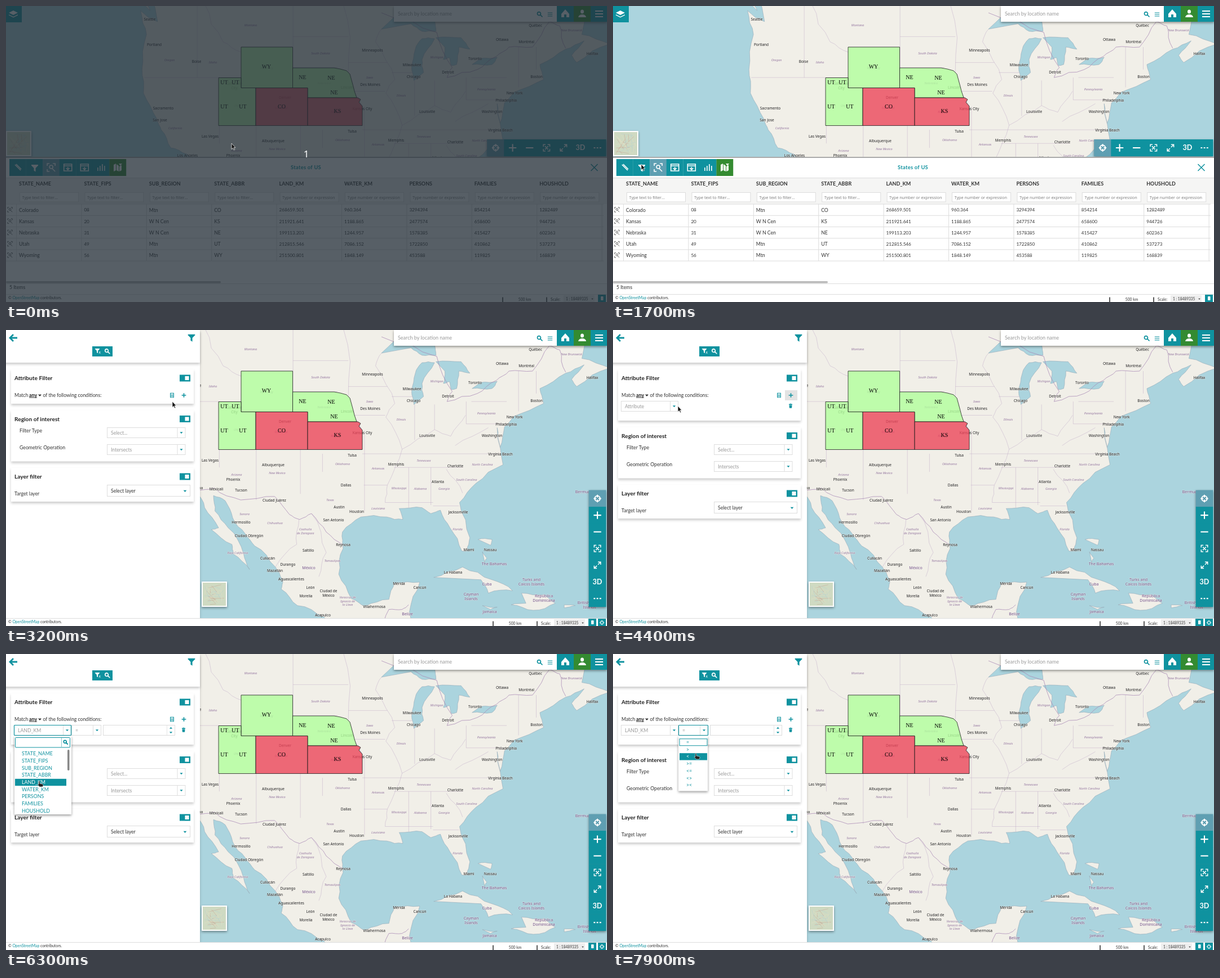
An HTML page that plays this animation: 1066 px wide and 526 px high, repeating every 8000 ms.

```html
<!DOCTYPE html>
<html lang="en">
<head>
<meta charset="utf-8">
<title>Filtering a map layer</title>
<style>
html, body { margin: 0; height: 100%; overflow: hidden; background: #fff; }
svg { display: block; width: 100vw; height: 100vh; font-family: Lato, sans-serif; }
text { white-space: pre; }
.map { font-family: "Noto Sans", sans-serif; text-anchor: middle; paint-order: stroke; stroke: #f2efe9; stroke-width: 1px; stroke-opacity: .6; }
.tag { font-family: "Liberation Serif", serif; text-anchor: middle; }
.shade { filter: drop-shadow(0 2px 2px #0006); }
.card { filter: drop-shadow(0 3px 2px #0003); }
</style>
</head>
<body>
<svg id="stage" viewBox="0 0 1066 526" preserveAspectRatio="none"></svg>
<script>
const TEAL = '#0f929f', GREEN = '#348b31', PALE = '#5f9fb2', INK = '#333', SEA = '#abd4de', LAND = '#f1efe8';
const MID = 'text-anchor="middle"', BOLD = 'font-weight="700"';

// Drawing helpers: each returns SVG markup
const rect = (x, y, w, h, fill, more = '') => `<rect x="${x}" y="${y}" width="${w}" height="${h}" fill="${fill}" ${more}/>`;
const text = (x, y, s, size = 8.7, fill = INK, more = '') =>
  `<text x="${x}" y="${y + size * .35}" font-size="${size}" fill="${fill}" ${more}>${s}</text>`;
const path = (d, stroke, width = 1, fill = 'none', more = '') =>
  `<path d="${d}" stroke="${stroke}" stroke-width="${width}" fill="${fill}" ${more}/>`;
const group = (id, body, more = '') => `<g id="${id}" ${more}>${body}</g>`;
const shaded = (body, kind = 'shade') => `<g class="${kind}">${body}</g>`;
const repeat = (n, f) => Array.from({ length: n }, (_, i) => f(i)).join('');
let seed = 7;
const random = () => (seed = seed * 16807 % 2147483647) / 2147483647;

const ICONS = {
  plus: 'M-7 0H7M0-7V7', minus: 'M-7 0H7', menu: 'M-7-5H7M-7 0H7M-7 5H7',
  locate: 'M-5 0a5 5 0 1 0 10 0a5 5 0 1 0-10 0M0-7V-2M0 7V2M-7 0H-2M7 0H2',
  extent: 'M-6-2V-6H-2M2-6H6V-2M6 2V6H2M-2 6H-6V2M-3-3L3 3M3-3L-3 3',
  full: 'M-6 6L-1 1M1-1L6-6M1-6H6V-1M-1 6H-6V1',
  dots: 'M-7 0h3M-1.5 0h3M4 0h3', cross: 'M-6-6L6 6M6-6L-6 6',
  back: 'M7 0H-5M0-6L-6 0L0 6', search: 'M-5-1.5a3.3 3.3 0 1 0 6.6 0a3.3 3.3 0 1 0-6.6 0M1 1L5 5',
  pencil: 'M-5-5L5 5M-3-6L6 3', bars: 'M-6 6V0M-2 6V-3M2 6V-6M6 6V-3',
  table: 'M-7-6H7V6H-7ZM-7-3H7M0-1V4M-3 1L0 4L3 1',
  zoom: 'M-7-3V-7H-3M3-7H7V-3M-7 3V7H-3M7 7L2 2M-3-1a3 3 0 1 0 6 0a3 3 0 1 0-6 0',
  sheet: 'M-3-4H3V4H-3ZM-2-1H2M-2 1.5H2'
};
const icon = (name, x, y, color = '#fff', k = 1, w = 1.9) =>
  path(ICONS[name], color, w, 'none', `transform="translate(${x} ${y}) scale(${k})"`);
const solid = (d, x, y, fill = '#fff', k = 1) => `<path d="${d}" fill="${fill}" transform="translate(${x} ${y}) scale(${k})"/>`;
const FUNNEL = 'M-6-6H6V-4.5L1.5 0V6.5L-1.5 4.5V0L-6-4.5Z', CARET = 'M-2.6-1.2H2.6L0 1.8Z', UP = 'M-2.6 1.2H2.6L0-1.8Z';
const HOME = 'M-7 0L0-8L7 0V6H2V1H-2V6H-7Z', USER = 'M-3-4a3 3.5 0 1 0 6 0a3 3.5 0 1 0-6 0M-7 6Q-6 1 0 1Q6 1 7 6Z';
const BIN = 'M-3.5-4H-1V-5H1V-4H3.5V-2.5H-3.5ZM-3-1.8H3L2.5 4.5H-2.5Z';

// Web Mercator; points are "degrees west,degrees north"
const project = s => {
  const [west, north] = s.split(',').map(Number);
  const m = Math.log(Math.tan(Math.PI / 4 + north * Math.PI / 360));
  return [417 + (111.05 - west) * 13.07, 73 + (.8814 - m) * 748.9];
};
// Midpoint displacement turns a few key points into a natural shoreline
const roughen = (pts, depth) => depth ? roughen(pts.flatMap((p, i) => {
  const q = pts[i + 1];
  if (!q) return [p];
  const k = (random() - .5) * .16;
  return [p, [(p[0] + q[0]) / 2 + (q[1] - p[1]) * k, (p[1] + q[1]) / 2 - (q[0] - p[0]) * k]];
}), depth - 1) : pts;
const trace = (s, depth = 0) => 'M' + roughen(s.split(' ').map(project), depth).map(p => p.map(v => v.toFixed(1))).join('L');
const shore = (s, fill) => path(trace(s, 2) + 'Z', '#93a8b8', .6, fill);
const border = (s, depth, color = '#bda5c4', width = .6) => path(trace(s, depth), color, width, 'none', 'opacity=".75"');

const west = '122.8,52 122.4,47.4 124.7,48.4 123.9,46.2 124.5,42.8 124.3,40.4 122.5,37.7 121.9,36.5 120.6,34.5 118.4,33.8 117.1,32.5 116,30.4 114.1,28 115.1,27.8 112.3,26 112.1,24.8 109.9,22.9 110.7,24.8 112.8,28 114.6,30 114.8,31.8 113.2,31.2 112.2,29.2 110.5,27.3 109.2,25.8 106.4,23.2 105.4,21.6 105.6,20.4 103.4,18.3 99.8,16.8';
const gulf = '98,14 88,14 88.2,17.5 86.8,21.3 90.2,21.2 91,19.1 94.2,18.2 96.1,19.2 97.8,22.3 97.2,25.5 97.3,27.5 94.8,29.3 91.3,29.3 89.1,29 89.6,30.3 86.5,30.4 85.3,29.7 84,30.1 82.7,28 81.1,25.2 80.4,25.2';
const east = '80,26.8 81.4,31 79.2,33.2 75.5,35.3 76.3,39.3 75.9,37.2 75.3,39.4 74,40.5 70,41.8 70.5,43.3 67,44.8 64.5,45.6 66.2,44.2 65.5,43.5 61,45.3 64.8,46.2 61,52';
const islands = ['126,49.4 123.4,48.4 124,49.4', '84.9,21.9 81,23.2 77,21.6 74.2,20.2 77.5,19.9 78.5,21.6',
  '73,19.9 69.9,19.7 68.4,18.6 71.4,17.7 74.4,18.4 72.4,18.6', '78.3,18.3 76.3,18.1 77.2,17.8', '67.2,18.4 65.7,18.3 67.2,18',
  '78.3,25.1 77.7,24.3 78,23.8', '78.9,26.6 77,26.6 77.2,25.9'];
const lakes = ['92,46.7 88,48.8 84.8,47.5 84.6,46.5 86.5,46.5 88,47.2', '87.6,41.7 87.9,43 87.4,44.8 86.5,45.8 84.8,45.8 86.5,43.8 86.3,42.5',
  '84.6,45.9 81.2,45.9 80,44.8 81.5,45 81.8,43.3 82.5,43.2 82.8,44 83.6,43.8 83.4,45', '79.7,43.3 77,43.3 76.3,44 78.5,43.9'];
const nations = ['117.1,32.5 114.7,32.7 111.1,31.3 106.5,31.7 104.5,29.6 103.1,29 101.5,29.7 99.5,27.5 97.2,25.9',
  '92,48.2 84.5,46.4 82.4,43 83.1,42 79,42.8 76.4,44.1 74.7,45 71.5,45 69.2,47.4 67.8,47 67,44.9', '92.2,14.5 91,17.8 89.2,17.8 88.3,18.4'];
const rivers = ['92,46.7 92.8,45.5 90.2,41.8 91.4,40.4 89.2,37 91.2,33 91.5,31', '89.2,37 84.8,39.1 82.6,38.4 80.6,40.6', '97.2,49 96.5,42.5 94.6,39',
  '83.2,34.8 81,32.1', '82,37.4 77.5,39.3', '106.4,23.2 103.5,26 103.2,29', '100.5,22 99.5,25 101.5,29.7', '116,49 113.5,45.5 111,44.5'];
// Straight state lines: [latitude, west end, east end] and [longitude, north end, south end]
const parallels = [[42, 124.2, 111], [37, 114, 94.6], [45, 111, 104], [46, 104, 96.5], [43, 104, 98], [43.5, 96.5, 91.2], [40.6, 95.8, 91.5],
  [36.5, 94.6, 76], [35, 90.3, 81], [33, 94.4, 91.2], [31, 91.5, 85], [30.6, 85, 81.5], [42.5, 90.6, 87.8], [39.7, 80.5, 75.6], [42, 79.8, 75]];
const meridians = [[117, 49, 42], [114, 42, 35], [109, 37, 31.3], [103, 37, 32], [100, 36.5, 34.5], [104, 49, 41],
  [94.3, 39, 30], [88.3, 35, 30.4], [85.3, 35, 30.7], [87.5, 41.7, 38], [84.8, 41.7, 39.1], [80.5, 42, 39.7], [73.4, 45, 41], [71, 45, 42.8]];
const grid = parallels.map(([n, a, b]) => `${a},${n} ${b},${n}`).concat(meridians.map(([w, a, b]) => `${w},${a} ${w},${b}`));

// "Name/second line x y|..."
const labels = (list, size, fill, kind = 'map', more = '') => list.split('|').map(s => {
  const [, name, x, y] = s.match(/(.*) (\d+) (\d+)$/);
  return name.split('/').map((part, i) => text(+x, +y + i * (size + 1), part, size, fill, `class="${kind}" ${more}`)).join('');
}).join('');
const cities = 'Seattle 255 24|Portland 263 69|Boise 338 99|Sacramento 279 182|San Jose 273 203|Las Vegas 362 232|Los Angeles 322 266|Phoenix 403 266|Albuquerque 474 240|Tijuana 338 281|Mexicali 373 283|Tucson 417 285|Ciudad Juárez 476 303|Salt Lake/City 405 138|Denver 495 163|Lincoln 605 145|Des Moines 646 140|Kansas City 632 183|Minneapolis 650 79|Tulsa 614 223|Memphis 692 239|Dallas 603 276|Austin 591 315|Houston 622 323|San Antonio 581 338|Hermosillo 417 342|Ciudad Obregón 431 366|Culiacán 464 406|Mazatlán 477 428|Saltillo 536 392|Reynosa 598 382|Durango 500 417';
const cities2 = 'Aguascalientes 506 443|León 540 458|Morelia 532 473|Ciudad de/México 572 464|Acapulco 562 507|Mérida 697 451|Cancún 734 458|Villahermosa 653 492|Milwaukee 720 105|Chicago 723 126|Detroit 784 118|Toronto 832 94|Ottawa 880 60|Montréal 923 64|Québec 939 35|Boston 941 126|New York 902 155|Philadelphia 887 168|Washington 862 188|Louisville 747 188|Virginia Beach 877 221|Charlotte 797 242|Atlanta 766 270|Jacksonville 802 324|Miami 821 391|Nassau 859 391|La Habana 793 431|Halifax 1040 85';
const regions = 'Montana 434 34|Oregon 290 96|Idaho 367 100|South Dakota 558 84|Wyoming 462 110|Nebraska 564 137|Utah 410 177|California 300 217|Arizona 409 257|New Mexico 481 254|Colorado 488 181|Kansas 585 188|Oklahoma 597 238|Texas 575 302|Iowa 645 127|Illinois 701 159|Michigan 764 91|Arkansas 660 246|Tennessee 741 232|Mississippi 697 281|Alabama 735 282|Georgia 777 282|Louisiana 660 317|Florida 801 354|South Carolina 817 266|North Carolina 845 239|Pennsylvania 852 148|New Brunswick 1003 43|Baja California 411 396|Sonora 423 327|Chihuahua 477 343|Coahuila/de Zaragoza 531 354|Tamaulipas 579 410|Veracruz de/Ignacio de/la Llave 606 475';
const countries = 'México 537 423|The Bahamas 866 416|Cuba 853 452|Belize 712 505|Jamaica 858 501|Cayman/Islands 825 470|Turks and/Caicos Islands 932 444|República/Dominicana 954 473|British Virgin/Islands 1035 485|Bermuda 1025 288';
const tags = 'WY 462 107|CO 489 178|KS 588 186|NE 526 126|NE 577 127|NE 582 153|UT 387 135|UT 407 135|UT 387 178|UT 420 178';

const feature = (d, fill) => path(d, '#222', .8, fill, 'fill-opacity=".8"');
const lime = '#b2ff9d', rose = '#ed465a';
const map = rect(0, 0, 1066, 526, SEA) + shore([west, gulf, east].join(' '), LAND) +
  islands.map(s => shore(s, LAND)).join('') + lakes.map(s => shore(s, SEA)).join('') +
  grid.map(s => border(s, 0)).join('') + rivers.map(s => border(s, 2)).join('') + nations.map(s => border(s, 2, '#a988b4', 1)).join('') +
  labels(regions, 5.6, '#95789f', 'map', 'font-style="italic"') + labels(cities, 6.5, '#222') + labels(cities2, 6.5, '#222') + labels(countries, 7, '#76558c') +
  feature('M417 73H508.5V145.5H417Z', lime) + feature('M377 127.5H417V145.5H443V212.5H377Z', lime) +
  feature('M508.5 110H582l11 2 11 3 6 6 6 22 2 8 4 12H535V145.5H508.5Z', lime) +
  feature('M443 145.5H535V212.5H443Z', rose) + feature('M535 163H624l5 3-3 5 6 7V212.5H535Z', rose) + labels(tags, 10, '#000', 'tag');

const header = shaded(rect(688, 0, 289, 28, '#fff') + rect(977, 0, 30, 28, TEAL) + rect(1007, 0, 30, 28, GREEN) + rect(1037, 0, 29, 28, TEAL)) +
  solid(HOME, 992, 14) + solid(USER, 1022, 14) + icon('menu', 1052, 14) +
  text(695, 14, 'Search by location name', 9, '#999') + icon('search', 947, 15, TEAL, .9) + icon('menu', 965, 15, TEAL, .6, 2);
const layersButton = rect(0, 0, 28, 29, TEAL) + solid('M0-6L8-2L0 2L-8-2ZM-8 1L0 5L8 1V2.5L0 6.5L-8 2.5Z', 13, 14);

// Map controls in a row or a column
const controls = (x, y, dx, dy) => shaded(['locate', 'plus', 'minus', 'extent', 'full', '3D', 'dots'].map((n, i) => {
  const cx = x + i * dx, cy = y + i * dy;
  return rect(cx - 15.3, cy - 15, 30.6, 30, i ? TEAL : PALE) +
    (n == '3D' ? text(cx, cy, n, 12.5, '#fff', `${MID} ${BOLD}`) : icon(n, cx, cy, '#fff', .95, i == 3 || i == 4 ? 1.6 : 2.2));
}).join(''));
const spot = () => 4 + random() * 37;
const thumb = (x, y) => shaded(rect(x, y, 45, 45, '#fff') + rect(x + 2, y + 2, 41, 41, '#cfdac2')) +
  repeat(30, i => path(`M${x + spot()} ${y + spot()}L${x + spot()} ${y + spot()}`, ['#c9a18f', '#b4d0d2', '#e6dfc4'][i % 3], .8, 'none', 'opacity=".6"'));
const corner = (x, globe) => rect(x, 513, 14, 13, TEAL) +
  (globe ? icon('locate', x + 7, 520, '#fff', .6, 1.5) : rect(x + 5, 516, 4.5, 7, '#fff', 'rx="1"'));
const footer = dx => rect(0, 512, 1066, 14, '#fff') + rect(0, 512, 1066, 1, '#ddd') +
  text(4, 518.5, `© <tspan fill="${TEAL}">OpenStreetMap</tspan> contributors.`, 6.8) +
  path(`M${881 + dx} 517.5V526M${959 + dx} 517.5V526`, '#333', 1.6) + text(920 + dx, 521.5, '500 km', 6.8, INK, MID) +
  text(966 + dx, 521.5, 'Scale:', 6.8) + rect(989 + dx, 514, 55, 12, '#eee') + text(993 + dx, 520.5, '1 : 18489335', 6.6) +
  solid(CARET, 1040 + dx, 520.5, INK, .7);

// Attribute table
const fields = ['STATE_NAME', 'STATE_FIPS', 'SUB_REGION', 'STATE_ABBR', 'LAND_KM', 'WATER_KM', 'PERSONS', 'FAMILIES', 'HOUSHOLD'];
const rows = ['Colorado|08|Mtn|CO|268659.501|960.364|3294394|854214|1282489', 'Kansas|20|W N Cen|KS|211921.641|1188.865|2477574|658600|944726',
  'Nebraska|31|W N Cen|NE|199113.203|1244.957|1578385|415427|602363', 'Utah|49|Mtn|UT|212815.546|7086.152|1722850|410862|537273',
  'Wyoming|56|Mtn|WY|251500.801|1848.149|453588|119825|168839'];
const colX = i => 18.5 + i * 115.4, lineY = i => 352 + i * 20.2;
const tools = ['pencil', '', 'zoom', 'table', 'table', 'bars', ''];
const table = rect(0, 269, 1066, 257, '#fff') + rect(0, 268, 1066, 2, '#aaa') +
  tools.map((t, i) => rect(6 + i * 29.57, 272, 29.8, 30, i == 2 ? PALE : i == 6 ? GREEN : TEAL) + (t && icon(t, 21 + i * 29.57, 287, '#fff', 1, 1.6))).join('') +
  solid(FUNNEL, 51, 288) + solid('M-7-5L-3-7V5L-7 7ZM-2-6L2-3V7L-2 5ZM3-2L7-4V5L3 7ZM2-7H8L5-3Z', 198, 287) +
  text(532, 287, 'States of US', 9.3, TEAL, `${MID} letter-spacing=".3" ${BOLD}`) + icon('cross', 1043.5, 287, TEAL, 1, 1.5) +
  rect(0, 305.5, 1066, 46.5, '#f5f5f4') + rect(0, 305, 1066, 1, '#ddd') +
  fields.map((f, i) => text(colX(i) + 4.5, 316, f, 9, INK, BOLD) + rect(colX(i) + 6, 331.5, 104, 16.5, '#fff', 'stroke="#ddd"') +
    `<svg x="${colX(i) + 10}" y="331" width="96" height="17">` +
    text(0, 9, i < 4 ? 'Type text to filter...' : 'Type number or expression', 7.3, '#777', 'font-family="Open Sans, sans-serif"') + '</svg>').join('') +
  rows.map((r, j) => icon('zoom', 7, lineY(j) + 10, '#444', .6, 1.4) +
    r.split('|').map((s, i) => text(colX(i) + 4.5, lineY(j) + 10.5, s, /\d/.test(s) ? 8.1 : 8.7)).join('')).join('') +
  repeat(6, j => rect(0, lineY(j) - .4, 1060, 1, '#ddd')) + repeat(10, i => rect(colX(i) - .5, 352, 1, 101, '#ddd')) +
  rect(0, 489, 381, 3.5, '#b9b9b9', 'rx="1.7"') + rect(0, 493, 1066, 1, '#ddd') + text(6, 499.5, '5 Items') + footer(0) + corner(1050, false);

// Filter panel
const box = (x, y, w, h = 18) => rect(x + .5, y + .5, w, h, '#fff', 'stroke="#ddd"');
const combo = (x, y, w, s, split = 14) => box(x, y, w) + text(x + 7, y + 9.5, s, 8.7, '#999') +
  rect(x + w - split, y + 1, 1, 17, '#ddd') + solid(CARET, x + w - split / 2 + .5, y + 9.5, TEAL);
const card = (y, h, title, body, more = '') => shaded(rect(9, y, 324, h, '#fff', more), 'card') +
  text(15, y + 15.5, title, 10.2, '#222', BOLD) + rect(308, y + 9.5, 19, 12, TEAL) + rect(317.5, y + 12, 7, 7, '#fff') + body;
const panel = rect(-60, 0, 404, 512, '#fff') + shaded(rect(-60, 0, 404, 58, '#fff'), 'card') +
  icon('back', 13, 14, TEAL, 1, 2.8) + solid(FUNNEL, 329, 14, TEAL, 1.05) +
  rect(153, 29, 36, 18, TEAL) + solid(FUNNEL, 162, 37, '#fff', .65) + text(164.5, 40, 'x', 7, '#fff') + icon('search', 180, 38, '#fff', .85) +
  card(70, 61, 'Attribute Filter', text(15, 115.5, 'Match') + text(41, 115.5, 'any', 8.9, '#222', BOLD + ' text-decoration="underline"') +
    path('M58 114.5l2 2.3 2-2.3', '#222', 1.5) + text(65.5, 115.5, 'of the following conditions:') +
    group('hover', rect(305, 107, 22, 18, '#e3e3e3')) + icon('sheet', 294.5, 116, TEAL, .95, 1.2) + icon('plus', 315.5, 116, TEAL, .55, 3), 'id="firstCard"') +
  group('lower',
    card(142.5, 91, 'Region of interest', text(24, 179, 'Filter Type') + text(24, 209, 'Geometric Operation') +
      combo(179, 173, 138.5, 'Select...') + combo(179, 203, 138.5, 'Intersects')) +
    card(245, 60, 'Layer filter', text(15, 290.5, 'Target layer') + box(179, 275, 147, 20) +
      text(186, 286, 'Select layer') + solid(CARET, 317.5, 286, TEAL, 1.1))) +
  group('condition', combo(14, 126, 101, '<tspan id="attrName"></tspan>') + solid(BIN, 315, 135, TEAL, .85)) +
  group('operator', combo(116, 126, 52, '=') + box(172, 126, 127) + rect(285, 127, 1, 17, '#e5e5e5') +
    solid(UP, 292.5, 131.5, TEAL) + solid(CARET, 292.5, 139.5, TEAL));

// Drop-down menus
const STEP = 12.7, ATTR_Y = 177.2, OP_Y = 157;
const focus = (x, w) => rect(x + .5, 126.5, w, 18, 'none', `stroke="${TEAL}" stroke-width="1.2" rx="1"`);
const items = (names, x, y, kind) => names.map((s, i) => text(x, y + i * STEP, s, 8.8, TEAL, `class="${kind}"`)).join('');
const attrMenu = focus(14, 101) + shaded(rect(15, 146, 101, 139, '#fff')) + rect(16.5, 148.5, 97, 17.5, '#fff', `stroke="${TEAL}" rx="1"`) +
  rect(98, 149, 1, 17, '#8cc8ce') + icon('search', 106, 157, TEAL, .75, 2.4) + rect(109, 170, 3.5, 37, '#888', 'rx="1.7"') +
  rect(16, 0, 91, 12.4, TEAL, 'id="attrMark"') + items(fields, 28, ATTR_Y, 'attr');
const opMenu = focus(116, 52) + shaded(rect(116, 146, 52, 97.5, '#fff')) + rect(118, 150.8, 49, 12, '#fff', `stroke="${TEAL}"`) +
  rect(118, 0, 49, 12.4, TEAL, 'id="opMark"') + items(['=', '&gt;', '&lt;', '&gt;=', '&lt;=', '&lt;&gt;', '&gt;&lt;'], 130, OP_Y, 'op');

const stage = document.getElementById('stage');
stage.innerHTML = map + layersButton + header +
  group('column', controls(1049, 299.5, 0, 29.6)) + group('sideThumb', thumb(347, 447)) +
  rect(0, 0, 1066, 526, '#fefefe', 'id="cover"') + group('panel', panel, 'class="card"') +
  group('foot', footer(-17) + corner(1033, false)) + corner(1050, true) +
  group('attrMenu', attrMenu) + group('opMenu', opMenu) +
  group('table', thumb(0, 222) + controls(868.5, 252, 30.1, 0) + table) +
  group('intro', rect(0, 0, 1066, 526, 'rgb(35,45,55)', 'opacity=".76"') + text(532.5, 263, '1', 17, '#fff', MID + ' font-family="Noto Sans, sans-serif"')) +
  group('cursor', path('M0 0V10.5L2.4 8.3L4.2 12L5.8 11.2L4 7.7H7Z', '#fff', .7, '#111', 'id="arrow"') +
    path('M0 0q1.2-1 2 .3V4l5 1.2q1.4.5 1 2.3L7 10H1.5L-2 6q0-1.4 2-.3Z', '#fff', .5, '#222', 'id="hand"'));

const $ = id => document.getElementById(id);
const show = (id, on) => $(id).setAttribute('display', on ? 'inline' : 'none');
const move = (id, x, y) => $(id).setAttribute('transform', `translate(${x} ${y})`);
const ramp = (t, from, to) => Math.max(0, Math.min(1, (t - from) / (to - from)));
const mix = (a, b, u) => a + (b - a) * u;

// Cursor moves: start time, end time, destination
const moves = [[500, 600, 262, 245], [700, 1200, 50, 281], [2900, 3200, 295, 127], [3200, 3400, 316, 116], [4000, 4400, 115, 135],
  [4400, 4500, 109, 134], [5100, 5900, 58, 226], [6300, 6900, 160, 134], [7100, 7700, 146, 168], [7800, 7900, 146, 177]];
const pointer = t => moves.reduce(([x, y], [from, to, tx, ty]) => {
  const u = ramp(t, from, to);
  return [mix(x, tx, u), mix(y, ty, u)];
}, [400, 244]);

const mark = (kind, y, top) => {
  const list = [...document.querySelectorAll('.' + kind)];
  const n = Math.max(0, Math.min(list.length - 1, Math.round((y + 2 - top) / STEP)));
  $(kind + 'Mark').setAttribute('y', top + n * STEP - 6.2);
  list.forEach((e, i) => e.setAttribute('fill', i == n ? '#fff' : TEAL));
};

function draw() {
  const t = Math.floor(performance.now() % 8000 / 100) * 100;
  const [x, y] = pointer(t), added = t >= 3800, chosen = t >= 6300;
  show('intro', t < 500);
  show('table', t < 2200);
  show('column', t >= 2200);
  show('sideThumb', t >= 2500);
  show('foot', t >= 2400);
  show('panel', t >= 2200);
  $('cover').setAttribute('y', mix(269, 512, ramp(t, 2100, 2400) ** .9));
  move('panel', -344 * (1 - ramp(t, 2100, 2500) ** 1.23), 0);
  $('firstCard').setAttribute('height', added ? 91 : 61);
  move('lower', 0, added ? 30 : 0);
  show('hover', t >= 3400 && t < 4700);
  show('condition', added);
  $('attrName').textContent = chosen ? 'LAND_KM' : 'Attribute';
  show('operator', chosen);
  show('attrMenu', t >= 4900 && t < 6500);
  show('opMenu', t >= 7200);
  mark('attr', y, ATTR_Y);
  mark('op', y, OP_Y);
  const hand = t == 500 || t >= 5300 && t < 6500 || t >= 7300;
  show('hand', hand);
  show('arrow', !hand);
  move('cursor', x, y);
  requestAnimationFrame(draw);
}
draw();
</script>
</body>
</html>
```
